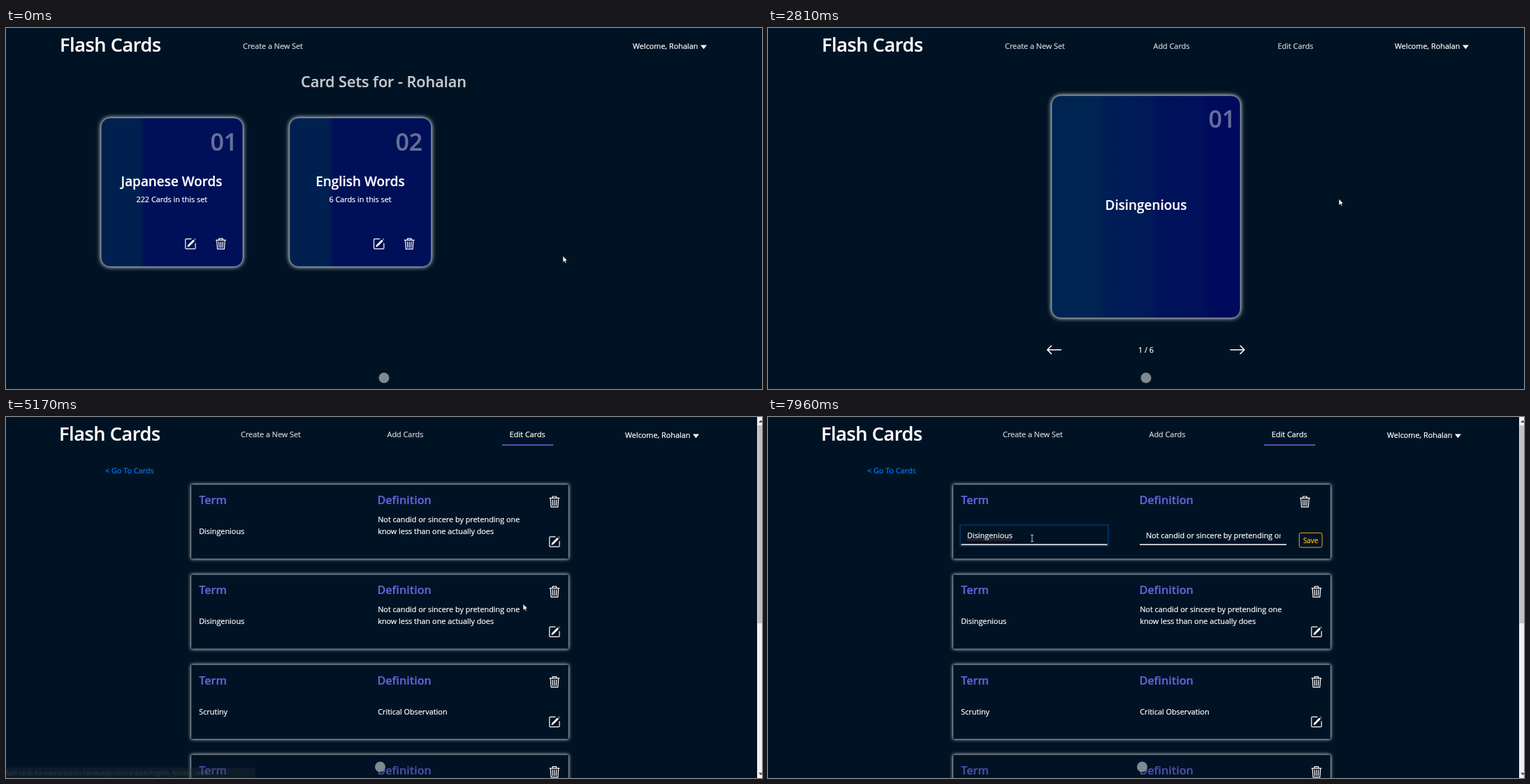
Recreate the animation shown at these times as an HTML page. Size 1082 px wide and 518 px high, loop 8000 ms.

```html
<!DOCTYPE html>
<html lang="en">
<head>
<meta charset="utf-8">
<title>Flash Cards</title>
<style>
html, body { margin: 0; width: 100%; height: 100%; overflow: hidden; background: #001324; }
svg { display: block; width: 100%; height: 100%; }
text {
  font: 10.85px "Open Sans", "Noto Sans", sans-serif; white-space: pre;
  color: #fff; fill: currentColor; stroke: currentColor; stroke-width: .22px;
}
.mid { text-anchor: middle; }
.h1, .h2, .h3, .h4, .num { font-weight: 600; }
.h1 { font-size: 27.2px; }
.brand { font-size: 27px; letter-spacing: -.35px; }
.h2 { font-size: 21.6px; color: #c6c9cd; }
.h3 { font-size: 18.9px; }
.h4 { font-size: 16.2px; color: #6264da; }
.num { font-size: 34px; opacity: .4; }
.link { color: #d2d5d8; }
.back { color: #007bff; }
.url { font-size: 8.1px; color: #a2a6ab; stroke: none; }
.icon { fill: none; stroke: #fff; stroke-width: 1.1; stroke-linejoin: round; stroke-linecap: round; }
.glow { stroke: #aab2ba; stroke-opacity: .6; filter: drop-shadow(0 0 3px #fff); }
.panel { fill: #001324; stroke: #aab2ba; stroke-opacity: .25; filter: drop-shadow(0 0 2.6px #fff); }
.mark { fill: #808890; }
.bar { fill: #6264da; }
.field { stroke: #fff; stroke-width: 1.4; }
.pointer { fill: #fff; stroke: #000; stroke-width: .7; stroke-linejoin: round; }

/* all timelines share one 8 s loop */
.t { animation: 8s linear infinite; }
.cut { animation: 8s step-end infinite; }

.home { animation-name: home; }
.empty { animation-name: empty; }
.study { animation-name: study; }
.links { animation-name: links; }
.wide { animation-name: wide; }
.edit { animation-name: edit; }
.view { animation-name: view; }
.form { animation-name: form; }
@keyframes home { 0% { opacity: 1 } 17.875%, 100% { opacity: 0 } }
@keyframes empty { 0% { opacity: 0 } 17.875% { opacity: 1 } 23.625%, 100% { opacity: 0 } }
@keyframes study { 0% { opacity: 0 } 23.625% { opacity: 1 } 51.75%, 100% { opacity: 0 } }
@keyframes links { 0% { opacity: 0 } 17.875% { opacity: 1 } 51.75%, 100% { opacity: 0 } }
@keyframes wide { 0% { opacity: 1 } 51.75%, 100% { opacity: 0 } }
@keyframes edit { 0% { opacity: 0 } 51.75%, 100% { opacity: 1 } }
@keyframes view { 0% { opacity: 1 } 82.25%, 100% { opacity: 0 } }
@keyframes form { 0% { opacity: 0 } 82.25%, 100% { opacity: 1 } }

.lift { animation-name: lift; }
@keyframes lift {
  0%, 9.3% { transform: none; animation-timing-function: ease }
  13%, 100% { transform: translateY(-7px) }
}
.nudge { animation-name: nudge; }
.nudge2 { animation-name: nudge2; }
.grow { animation-name: grow; }
.settle { animation-name: settle; }
@keyframes nudge { 0%, 43.1% { transform: none } 45%, 100% { transform: translateY(-1px) } }
@keyframes nudge2 { 0%, 43.1% { transform: none } 45%, 100% { transform: translateY(-2px) } }
@keyframes grow { 0%, 43.1% { opacity: 0 } 45%, 100% { opacity: 1 } }
@keyframes settle { 0%, 59.8% { transform: translateY(-1px) } 61.5%, 100% { transform: none } }

.status { animation-name: status; }
@keyframes status {
  0%, 45.6% { opacity: 0 } 47.5%, 62.8% { opacity: 1 } 65.4%, 100% { opacity: 0 }
}

.fill { animation-name: fill; }
.save { font-size: 9.9px; color: #ffc107; animation-name: save; }
@keyframes fill {
  0%, 82.25% { fill-opacity: 0 } 84.1%, 86.9% { fill-opacity: 1 } 88.8%, 100% { fill-opacity: 0 }
}
@keyframes save {
  0%, 82.25% { color: #ffc107 } 84.1%, 86.9% { color: #212529 } 88.8%, 100% { color: #ffc107 }
}
.ring { animation-name: ring; }
.caret { animation-name: caret; }
.spell { animation-name: spell; }
@keyframes ring { 0%, 93% { opacity: 0 } 94.625%, 100% { opacity: 1 } }
@keyframes caret { 0% { opacity: 0 } 93% { opacity: 1 } 99.5%, 100% { opacity: 0 } }
@keyframes spell { 0% { opacity: 0 } 99.5%, 100% { opacity: 1 } }

.move { animation-name: move; }
@keyframes move {
  0%, .49% { transform: translate(797px, 327px) }
  .5%, 4% { transform: translate(795px, 325px); animation-timing-function: ease-in-out }
  12.2%, 14.3% { transform: translate(540px, 240px) }
  15%, 28.5% { transform: translate(537px, 233px); animation-timing-function: ease-in-out }
  31.25%, 35.1% { transform: translate(817px, 245px); animation-timing-function: ease-in-out }
  45%, 58.6% { transform: translate(752px, 28px); animation-timing-function: ease-in-out }
  64.6% { transform: translate(740px, 268px) }
  68.4%, 69% { transform: translate(746px, 264px); animation-timing-function: ease-in-out }
  78.75%, 86.4% { transform: translate(784px, 180px); animation-timing-function: ease-in-out }
  91.1%, 100% { transform: translate(378px, 174px) }
}
.arrow { animation-name: arrow; }
.hand { animation-name: hand; }
.beam { fill: none; stroke: #c4c8cc; animation-name: beam; }
@keyframes arrow {
  0% { opacity: 1 } 9.3% { opacity: 0 } 17.875% { opacity: 1 } 23.625% { opacity: 0 }
  30.06% { opacity: 1 } 43.1% { opacity: 0 } 60% { opacity: 1 } 76.3% { opacity: 0 }
  87% { opacity: 1 } 87.4% { opacity: 0 } 89.1% { opacity: 1 } 89.5%, 100% { opacity: 0 }
}
@keyframes hand {
  0% { opacity: 0 } 9.3% { opacity: 1 } 17.875% { opacity: 0 } 23.625% { opacity: 1 }
  30.06% { opacity: 0 } 43.1% { opacity: 1 } 60% { opacity: 0 } 76.3% { opacity: 1 }
  87%, 100% { opacity: 0 }
}
@keyframes beam {
  0% { opacity: 0 } 87.4% { opacity: 1 } 89.1% { opacity: 0 } 89.5%, 100% { opacity: 1 }
}
</style>
</head>
<body>
<svg viewBox="0 0 1082 518" preserveAspectRatio="none">
  <defs>
    <linearGradient id="two">
      <stop offset=".27" stop-color="#002150"/>
      <stop offset=".31" stop-color="#001058"/>
    </linearGradient>
    <linearGradient id="four">
      <stop offset=".25" stop-color="#002451"/>
      <stop offset=".29" stop-color="#001d56"/>
      <stop offset=".52" stop-color="#001a58"/>
      <stop offset=".56" stop-color="#00125a"/>
      <stop offset=".79" stop-color="#00105b"/>
      <stop offset=".84" stop-color="#000a5c"/>
    </linearGradient>
    <clipPath id="inner"><path d="M532 158h201.5v24H532z"/></clipPath>

    <g id="pencil" class="icon" transform="scale(1.1) translate(-8 -8)">
      <path d="M9 1.5H2.5a1 1 0 0 0-1 1v11a1 1 0 0 0 1 1h11a1 1 0 0 0 1-1V7.5"/>
      <path d="M4.5 11.5l.8-2.2L11.7 2.9l1.4 1.4L6.7 10.7zM13.2 1.4l1.4 1.4" fill="#fff" stroke-width=".9"/>
    </g>
    <g id="trash" class="icon" transform="scale(1.1) translate(-8 -8)">
      <path d="M1.7 3.3h12.6M5.5 3V1.2h5V3M2.7 3.5l.9 11.5h8.8l.9-11.5M5.4 5.5l.4 7.3M8 5.5v7.3M10.6 5.5l-.4 7.3"/>
    </g>
    <path id="left" class="icon" style="stroke-width:1.6" d="M10 0H-9.5M-4 -5.7L-9.7 0L-4 5.7"/>
    <path id="down" d="M0 0h9L4.5 5.8z" fill="#fff"/>

    <g id="row">
      <rect class="panel" x="265" y="97" width="540" height="106.5"/>
      <text class="h4" x="276.2" y="125">Term</text>
      <text class="h4" x="531.4" y="125">Definition</text>
    </g>
    <g id="tools">
      <use href="#trash" x="785" y="121.5"/>
      <use href="#pencil" x="785" y="179"/>
    </g>
    <g id="vague">
      <text x="276.2" y="168">Disingenious</text>
      <text x="532.2" y="151">Not candid or sincere by pretending one</text>
      <text x="532.2" y="168">know less than one actually does</text>
    </g>
  </defs>

  <rect width="1082" height="518" fill="#001324"/>

  <g class="cut wide">
    <text class="h1 brand" x="77" y="34">Flash Cards</text>
    <g class="t nudge">
      <text class="link mid" x="382" y="30">Create a New Set</text>
    </g>
    <text x="897" y="30">Welcome, Rohalan</text>
    <use href="#down" x="994" y="24.5"/>
    <circle class="mark" cx="541" cy="502" r="7.5"/>
  </g>

  <g class="cut links">
    <text class="link mid t nudge" x="577.5" y="30">Add Cards</text>
    <text class="link mid t nudge2" x="755" y="30">Edit Cards</text>
    <rect class="bar t grow" x="718.5" y="38.4" width="73" height="1.6"/>
  </g>

  <g class="cut home">
    <text class="h2 mid" x="540.5" y="85">Card Sets for - Rohalan</text>
    <g>
      <rect class="glow" x="136" y="129" width="203" height="213.5" rx="13" fill="url(#two)"/>
      <text class="num" x="292.4" y="176">01</text>
      <text class="h3 mid" x="237" y="227">Japanese Words</text>
      <text class="mid" x="237.3" y="250">222 Cards in this set</text>
      <use href="#pencil" x="264" y="309.7"/>
      <use href="#trash" x="307.5" y="309.5"/>
    </g>
    <g class="t lift">
      <rect class="glow" x="405.7" y="129" width="203" height="213.5" rx="13" fill="url(#two)"/>
      <text class="num" x="557.4" y="176">02</text>
      <text class="h3 mid" x="507" y="227">English Words</text>
      <text class="mid" x="507" y="250">6 Cards in this set</text>
      <use href="#pencil" x="533.7" y="309.7"/>
      <use href="#trash" x="577.2" y="309.5"/>
    </g>
  </g>

  <g class="cut empty">
    <text class="h1" x="146.4" y="90">No Cards Found</text>
  </g>

  <g class="cut study">
    <rect class="glow" x="406" y="97" width="270" height="319" rx="13" fill="url(#four)"/>
    <text class="num" x="630.4" y="143">01</text>
    <text class="h3 mid" x="541" y="261">Disingenious</text>
    <text class="mid" x="541" y="466">1 / 6</text>
    <use href="#left" x="409.5" y="461.7"/>
    <use href="#left" transform="translate(672 461.7) scale(-1 1)"/>
  </g>

  <g class="cut edit">
    <text class="h1 brand" x="76" y="34">Flash Cards</text>
    <text class="link mid" x="379" y="29">Create a New Set</text>
    <text class="link mid" x="571.5" y="29">Add Cards</text>
    <g class="t settle">
      <text class="mid" x="746.3" y="29">Edit Cards</text>
      <rect class="bar" x="710" y="39.4" width="73.3" height="1.6"/>
    </g>
    <text x="886" y="30">Welcome, Rohalan</text>
    <use href="#down" x="983" y="24.5"/>
    <text class="back" x="142" y="81">&lt; Go To Cards</text>

    <use href="#row"/>
    <g class="cut view">
      <use href="#vague"/>
      <use href="#tools"/>
    </g>
    <g class="cut form">
      <rect class="t ring" x="275" y="155" width="212" height="30" fill="none" stroke="#022c5b" stroke-width="2.2"/>
      <path class="field" d="M276.5 183h209M532 183h210"/>
      <text x="285" y="174">Disingenious</text>
      <path class="cut caret" d="M350.5 163.5v13" stroke="#fff" stroke-width=".8"/>
      <path class="cut spell" d="M285 176.3h64.5" stroke="#d0303c" stroke-width="1.1" stroke-dasharray="1.5 .8"/>
      <g clip-path="url(#inner)">
        <text x="541" y="174">Not candid or sincere by pretending one</text>
      </g>
      <use href="#trash" x="768.5" y="121.5"/>
      <rect class="t fill" x="760.3" y="166.3" width="32.8" height="20.8" rx="2.5" fill="#ffc107" stroke="#ffc107" stroke-width=".9"/>
      <text class="mid t save" x="776.6" y="180.6">Save</text>
    </g>

    <g transform="translate(0 129.2)">
      <use href="#row"/><use href="#vague"/><use href="#tools"/>
    </g>
    <g transform="translate(0 258.5)">
      <use href="#row"/><use href="#tools"/>
      <text x="276.2" y="168">Scrutiny</text>
      <text x="532.2" y="168">Critical Observation</text>
    </g>
    <g transform="translate(0 387.7)">
      <use href="#row"/>
      <rect x="266" y="99" width="538" height="32" fill="#001324" fill-opacity=".25"/>
      <use href="#tools"/>
    </g>
    <circle class="mark" cx="535.5" cy="502" r="7.5"/>

    <path d="M1075 0h7v518h-7z" fill="#f1f1f1"/>
    <path d="M1075.6 12h6.4v284h-6.4z" fill="#c1c1c1"/>
    <path d="M1077 8l3.3-3.6 3.3 3.6z" fill="#505050"/>
    <path d="M1077 510.5l3.3 3.6 3.3-3.6z" fill="#505050"/>
  </g>

  <g class="t status">
    <path d="M0 503h355.5q1.5 0 1.5 1.5V518H0z" fill="#303236"/>
    <text class="url" x="-2.5" y="513.5">flash-cards-for-memorization.herokuapp.com/cardsets/English_Words/.../edit</text>
  </g>

  <g class="t move">
    <path class="pointer cut arrow" d="M0 0V9.6L2.2 7.6L3.7 11L5.2 10.3L3.8 7H6.6Z"/>
    <path class="pointer cut hand" d="M-1.1 .6Q0 -.5 1 .6V4.4Q2.2 3.8 2.8 4.8Q4 4.4 4.5 5.4Q5.8 5.2 5.8 6.6V9.4L4.6 13H-1.6L-4.4 8.6Q-4.8 7 -3.2 7.1L-1.1 8.8Z"/>
    <path class="cut beam" d="M-2 -4.7h4M0 -4.7V4.7M-2 4.7h4"/>
  </g>
</svg>
</body>
</html>
```
